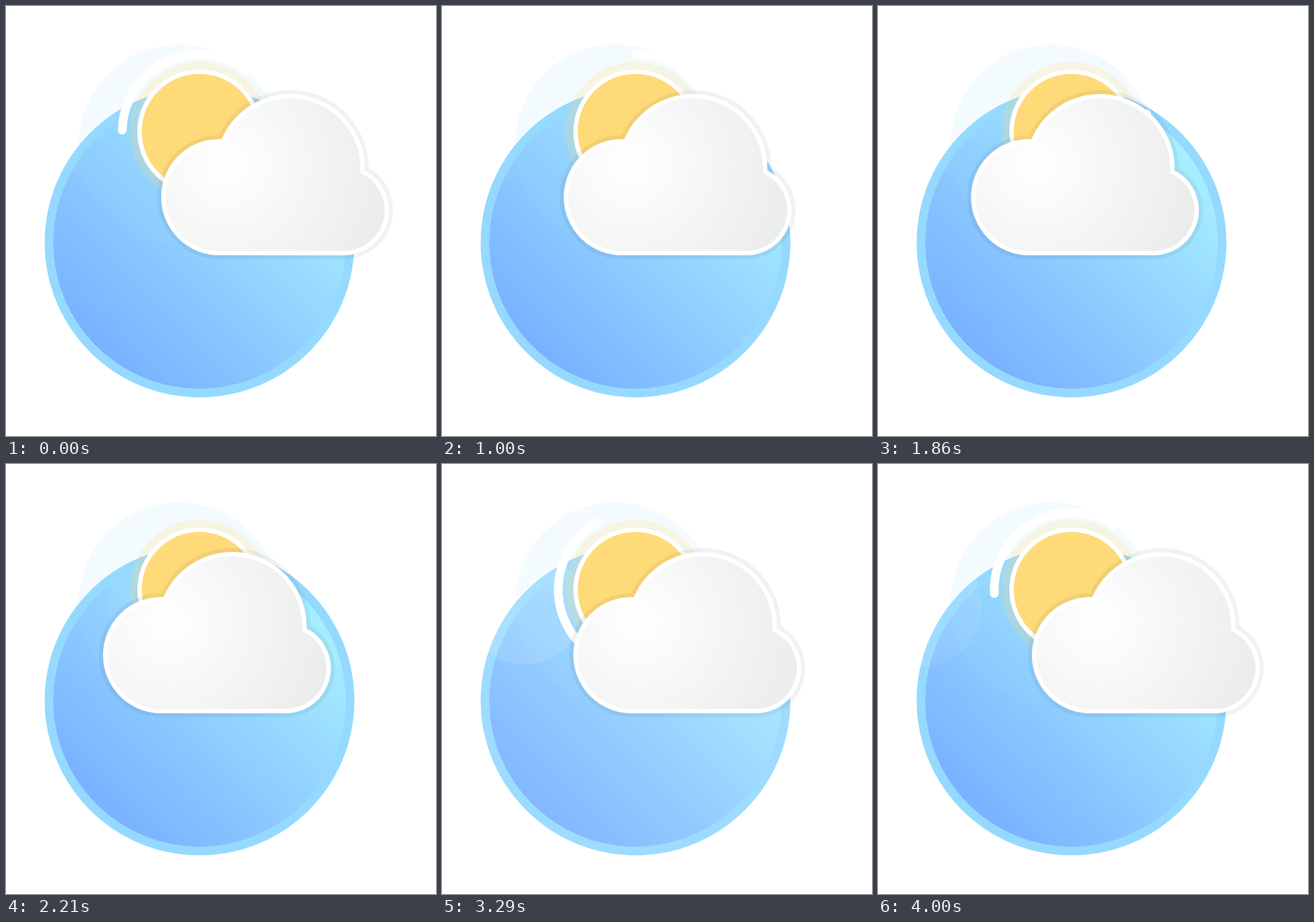
Recreate the animation shown at these times as an HTML page with a canvas. Size 640 by 640 pixels, loop 4.07 s.

```html
<!DOCTYPE html>
<html lang="en">
<head>
<meta charset="utf-8">
<title>Partly cloudy</title>
<style>
  html, body { margin: 0; width: 100%; height: 100%; overflow: hidden; background: #fff; }
  canvas { display: block; width: 640px; height: 640px; }
</style>
</head>
<body>
<canvas id="stage"></canvas>
<script>
const LOOP = 4070;
const TAU = Math.PI * 2;
const WHITE = '#fff';
const canvas = document.getElementById('stage');
const ctx = canvas.getContext('2d');
const ratio = window.devicePixelRatio || 1;
canvas.width = canvas.height = 640 * ratio;

const rad = degrees => degrees * Math.PI / 180;
const clamp = v => Math.max(0, Math.min(1, v));

function withStops(gradient, from, to) {
  gradient.addColorStop(0, from);
  gradient.addColorStop(1, to);
  return gradient;
}

const skyFill = withStops(ctx.createLinearGradient(134, 506, 442, 198), '#79b1ff', '#a8efff');
const cloudFill = withStops(ctx.createRadialGradient(329, 236, 0, 329, 236, 242), '#ffffff', '#ebecec');

const cloud = new Path2D();
cloud.arc(317.5, 284.5, 83.25, rad(90), rad(274));
cloud.arc(423, 242, 107.75, rad(202.1), rad(362.45));
cloud.arc(503, 304, 63.75, rad(-64.3), rad(90));
cloud.closePath();

function disc(x, y, r, fill) {
  ctx.beginPath();
  ctx.arc(x, y, r, 0, TAU);
  ctx.fillStyle = fill;
  ctx.fill();
}

function drawSky() {
  disc(288, 352, 230.5, '#96d9ff');
  disc(288, 352, 217.5, skyFill);
  disc(258, 207, 150, 'rgba(149,217,255,0.11)');
}

function drawRipple(t) {
  const age = t - 2200;
  if (age <= 0) return;
  const fade = 1 - clamp(age / 1800) ** 2;
  disc(294, 336, age * 0.307, `rgba(255,255,255,${0.12 * fade})`);
}

function drawBubble(t) {
  if (t < 2000) return;
  const left = 4000 - t;
  const r = 90 - 28 * Math.max(0, left / 1790) ** 2.2;
  const alpha = 0.1 * clamp((t - 2000) / 450) * (1 - 0.3 * clamp((t - 3300) / 700));
  disc(65 + left * 0.0822, 212, r, `rgba(255,255,255,${alpha})`);
}

function drawSun(t) {
  const spin = t * 0.089;
  disc(288, 187, 104, 'rgba(255,216,110,0.2)');
  ctx.beginPath();
  ctx.arc(288, 187, 115, rad(181 + spin), rad(307 + spin));
  ctx.lineWidth = 13;
  ctx.lineCap = 'round';
  ctx.strokeStyle = WHITE;
  ctx.stroke();
  disc(288, 187, 92.5, WHITE);
  disc(288, 187, 86, '#ffda79');
}

function drawCloud(t) {
  const shift = t < 1970 ? t / 1970 : clamp((4042 - t) / 2072);
  ctx.save();
  ctx.translate(-98 * shift, 0);
  ctx.lineJoin = 'round';
  ctx.lineWidth = 18.5;
  ctx.strokeStyle = 'rgba(0,0,0,0.05)';
  ctx.stroke(cloud);
  ctx.fillStyle = cloudFill;
  ctx.fill(cloud);
  ctx.lineWidth = 6.5;
  ctx.strokeStyle = WHITE;
  ctx.stroke(cloud);
  ctx.restore();
}

function draw(t) {
  ctx.setTransform(ratio, 0, 0, ratio, 0, 0);
  ctx.fillStyle = WHITE;
  ctx.fillRect(0, 0, 640, 640);
  drawSky();
  drawRipple(t);
  drawBubble(t);
  drawSun(t);
  drawCloud(t);
}

const start = performance.now();
function tick() {
  draw((performance.now() - start) % LOOP);
  requestAnimationFrame(tick);
}
tick();
</script>
</body>
</html>
```
